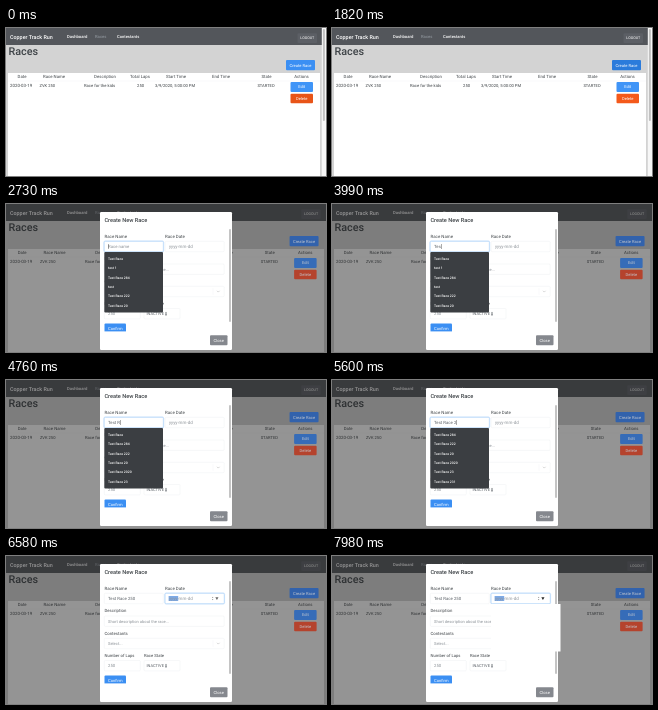
An HTML page for the animation above (8 s loop, 320 px wide and 148 px high).

```html
<!DOCTYPE html>
<html lang="en">
<head>
<meta charset="utf-8">
<title>Races</title>
<style>
html, body { margin: 0; width: 100%; height: 100%; overflow: hidden; background: #d3d3d3; }
svg { display: block; width: 100vw; height: 100vh; }
text { font-family: Roboto, Inter, sans-serif; font-size: 4.3px; fill: #3e4347; white-space: pre; text-rendering: geometricPrecision; }
.mid { text-anchor: middle; }
.med { font-weight: 500; }
.light { fill: #fff; }
.soft { fill: #c3c7cf; }
.hint { fill: #8b9197; }
.value { fill: #5a6066; }
.field { fill: #fff; stroke: #e3e6e9; stroke-width: .3; }
.glow { fill: none; stroke: #cfe5fd; stroke-width: 1; }
.ring { fill: #fff; stroke: #8fc3f7; stroke-width: .4; }
.rule { stroke: #e6e9ec; stroke-width: .3; }
</style>
</head>
<body>
<svg id="stage" viewBox="0 0 320 148" preserveAspectRatio="none"></svg>
<script>
const LOOP = 8000;
const stage = document.getElementById('stage');

const text = (x, cy, s, cls = '', size = 4.3) =>
  `<text x="${x}" y="${cy + size * 0.35}" class="${cls}" style="font-size:${size}px">${s}</text>`;
const rect = (x, y, w, h, attrs) =>
  `<rect x="${x}" y="${y}" width="${w}" height="${h}" ${attrs}/>`;
const button = (x, y, w, h, fill, label, ink = 'light', id = '') =>
  rect(x, y, w, h, `rx="1" fill="${fill}" id="${id}"`) + text(x + w / 2, y + h / 2, label, 'mid ' + ink, 4.1);
const field = (x, y, w) => rect(x, y, w, 10.4, 'rx="1" class="field"');
const focusRing = (id, x) => `<g id="${id}">` +
  rect(x - .4, 37, 59.8, 11, 'rx="1.3" class="glow"') + rect(x, 37.4, 59, 10.2, 'rx="1" class="ring"') + '</g>';

// The content is k times wider while the scrollbar is hidden.
function page(k) {
  const heads = [[16, 'Date'], [48, 'Race Name'], [99, 'Description'], [134, 'Total Laps'],
    [170, 'Start Time'], [215, 'End Time'], [260.5, 'State'], [295.5, 'Actions']];
  return rect(0, 0, 320, 148, 'fill="#d3d3d3"') +
    rect(0, 0, 316 * k, 17, 'fill="#53565b"') +
    text(4, 9, 'Copper Track Run', 'light med', 5.4) +
    text(61, 9, 'Dashboard', 'light med', 4.2) +
    text(89, 9, 'Races', 'hint med', 4.2) +
    text(111, 9, 'Contestants', 'light med', 4.1) +
    rect(291.5 * k, 5.3, 19.5, 9.6, 'rx="1" fill="#5c5f65"') +
    text(301.3 * k, 10.2, 'LOGOUT', 'mid light', 3.7) +
    text(2.5, 23.7, 'Races', 'med', 10.8) +
    rect(2, 45, 312 * k, 103, 'fill="#fff"') +
    heads.map(([x, s]) => text(x * k, 48.6, s, 'mid')).join('') +
    `<path d="M2 53H${314 * k}" class="rule"/>` +
    text(4 * k, 57.8, '2020-03-19', '', 4.4) +
    text(33.5 * k, 57.8, 'ZVK 250', '', 4.1) +
    text(78 * k, 57.8, 'Race for the kids', '', 4.2) +
    text(134.6 * k, 57.8, '250', 'mid', 4.2) +
    text(169 * k, 57.8, '3/9/2020, 5:00:00 PM', 'mid', 4.15) +
    text(260 * k, 57.8, 'STARTED', 'mid', 4.1);
}

const actions = (k, [create, edit, del], ink, id) =>
  button(280 * k, 32, 29, 10.2, create, 'Create Race', ink, id + 'Create') +
  button(284.5 * k, 54, 22.5, 10, edit, 'Edit', ink) +
  button(284.5 * k, 65.7, 22.5, 9.5, del, 'Delete', ink, id + 'Delete');

const scrollbar = rect(315.8, 0, 4.2, 148, 'fill="#f7f7f7"') +
  rect(316.9, 1, 2, 92, 'rx="1" fill="#c1c1c1"');

const form =
  text(98.5, 32.3, 'Race Name', '', 4.4) + text(159, 32.3, 'Race Date', '', 4.4) +
  field(98.3, 37.3, 59) + field(159.2, 37.3, 59) +
  focusRing('nameRing', 98.3) + focusRing('dateRing', 159.2) +
  '<text id="name" x="102" y="44.2" class="value"></text>' +
  '<g id="nameHint">' + text(102, 42.6, 'Race name', 'hint') + '</g>' +
  rect(0, 40, .35, 5, 'id="caret" fill="#111"') +
  rect(162.6, 40, 9.6, 5, 'id="picked" fill="#7eaae6"') +
  text(163, 42.6, 'yyyy-mm-dd', 'hint', 4.45) +
  '<g id="tools"><path d="M206 42l.7-1.2.7 1.2zM206 43l.7 1.2.7-1.2z" fill="#888"/>' +
  '<path id="arrow" d="M209.3 41.3h3.2l-1.6 2.7z"/></g>' +
  text(98.5, 54.8, 'Description') + field(98.3, 60, 119.9) +
  text(102, 65.3, 'Short description about the race...', 'hint', 4.05) +
  text(98.5, 77.4, 'Contestants') + field(98.3, 82.3, 119.9) +
  text(102, 87.4, 'Select...', 'hint', 4.1) +
  '<path d="M207 84.3v6.4" class="rule"/>' +
  '<path d="M211 86.8l1.3 1.3 1.3-1.3" fill="none" stroke="#bbb" stroke-width=".6"/>' +
  text(98.5, 99.7, 'Number of Laps', '', 4.2) + text(138, 99.7, 'Race State', '', 4.2) +
  field(98.3, 104.5, 36) + field(138, 104.5, 36) +
  text(102, 109.8, '250', 'hint') + text(140.5, 109.8, 'INACTIVE', 'value', 4) +
  '<path d="M159 109.4l1-1.7 1 1.7zM159 110.2l1 1.7 1-1.7z" fill="#5a6066"/>' +
  button(98.5, 119.5, 21.5, 10, '#3b8ff3', 'Confirm') +
  rect(223, 25, 2, 93, 'rx="1" fill="#c4c4c4"');

// The footer covers the lower edge of the scrolled form.
const dialog = rect(93.1, 7.1, 133.8, 139.8, 'id="outline" rx="2" fill="#7189d2"') +
  rect(94, 8, 132, 138, 'rx="1.2" fill="#fff"') +
  text(98.4, 16.3, 'Create New Race', 'med', 5.6) +
  form +
  rect(95, 127.4, 130, 18, 'fill="#fff"') +
  button(204, 131.3, 17.5, 10, '#85888e', 'Close') +
  '<g id="list">' + rect(98.3, 48, 58.7, 0, 'id="listBox" rx="1" fill="#3b3e42"') +
  [0, 1, 2, 3, 4, 5].map(i => text(102, 55 + i * 9.3, '', 'light med item', 3.4)).join('') + '</g>' +
  rect(159, 48, 69.5, 47.5, 'id="calendar" fill="#fff"');

stage.innerHTML =
  `<g>${page(1)}${actions(1, ['#3b8ff3', '#3f94f7', '#f4591b'], 'light', 'live')}${scrollbar}</g>` +
  `<g id="modal">${page(1.0127)}` + rect(0, 0, 320, 148, 'id="shade" fill="#1c1c1c"') +
  actions(1.0127, ['#3262ac', '#366cb8', '#b5432d'], 'soft', 'dim') + dialog + '</g>';

const el = id => document.getElementById(id);
const items = [...document.querySelectorAll('.item')];
const nameText = el('name');

const typed = 'Test Race 250';
const keys = [3640, 3780, 3990, 4130, 4340, 4760, 4900, 5110, 5250, 5390, 5600, 5810, 6230];
const history = ['Test Race', 'test 1', 'Test Race 284', 'test', 'Test Race 222', 'Test Race 20',
  'Test Race 2020', 'Test Race 23', 'Test Race 231', 'Test Race 250', 'Test Race 251'];
const suggest = s => history
  .filter(h => h !== s && h.toLowerCase().startsWith(s.toLowerCase()))
  .slice(0, items.length);

const ramp = (t, a, b) => Math.min(1, Math.max(0, (t - a) / (b - a)));
const show = (id, on) => el(id).style.opacity = +on;
const mix = (a, b, p) => `rgb(${a.map((v, i) => Math.round(v + (b[i] - v) * p))})`;
const within = (t, a, b) => t >= a && t < b;

function draw(t) {
  el('liveDelete').style.fill = mix([232, 84, 24], [244, 89, 27], ramp(t, 70, 210));
  el('liveCreate').style.fill = mix([59, 143, 243], [43, 123, 219], ramp(t, 1540, 1820));
  el('modal').style.display = t < 1960 ? 'none' : '';
  el('shade').style.opacity = .45 + .02 * ramp(t, 1960, 2170);
  show('outline', 1 - ramp(t, 2380, 2520));

  show('nameRing', ramp(t, 2380, 2590) * (1 - ramp(t, 6370, 6580)));
  show('dateRing', ramp(t, 6370, 6580));
  show('picked', t >= 6440);
  show('tools', t >= 6440);
  el('arrow').style.fill = mix([105, 105, 105], [40, 40, 40], ramp(t, 7350, 7490));
  show('calendar', t >= 7980);

  const value = typed.slice(0, keys.filter(k => t >= k).length);
  nameText.textContent = value;
  show('nameHint', !value);
  el('caret').setAttribute('x', 102.2 + (value ? nameText.getComputedTextLength() : 0));
  show('caret', within(t, 2450, 3290) || within(t, 3640, 6440));

  const found = suggest(value);
  show('list', found.length > 0 && t >= 2730);
  el('listBox').setAttribute('height', 4.7 + 9.3 * found.length);
  items.forEach((item, i) => item.textContent = found[i] || '');
}

function tick() {
  draw(performance.now() % LOOP);
  requestAnimationFrame(tick);
}
tick();
</script>
</body>
</html>
```
